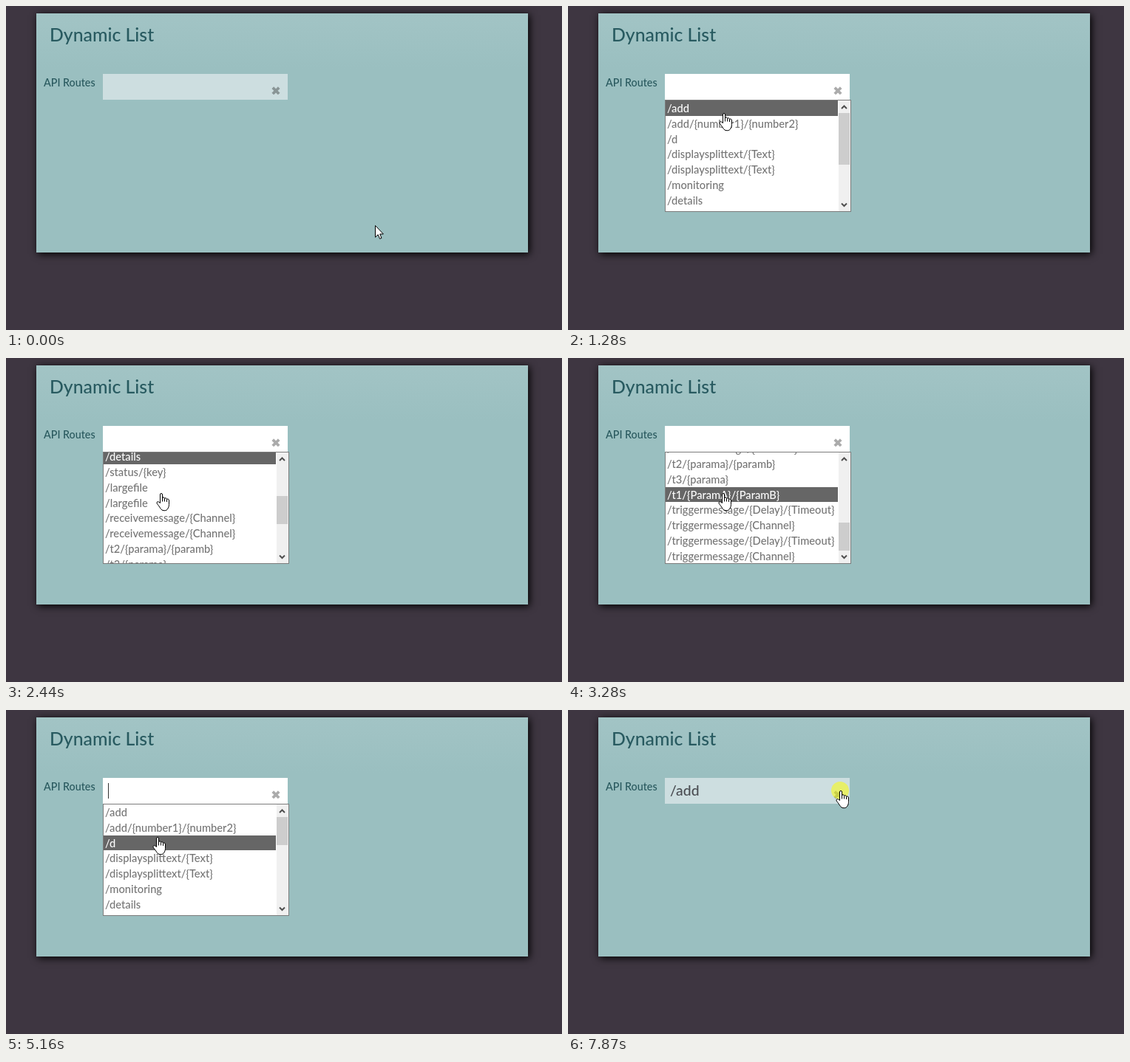
These frames come from a looping animation (752x439 px, 8000 ms). An HTML page with a canvas:

```html
<!DOCTYPE html>
<html lang="en">
<head>
<meta charset="utf-8">
<title>Dynamic List</title>
<style>
  html, body { margin: 0; width: 100%; height: 100%; overflow: hidden; background: #3e3641; }
  body { position: relative; font: 500 15px Lato, "Open Sans", sans-serif; }
  body div, canvas { position: absolute; white-space: pre; }
  canvas { left: 0; top: 0; }
  #panel {
    left: 41px; top: 10px; width: 665px; height: 324px;
    background: linear-gradient(#a2c4c5, #9abfc0 75px);
    box-shadow: 2px 2px 10px #000;
  }
  #title { left: 59px; top: 24px; font-size: 24.8px; line-height: 30px; color: #285a60; }
  #label { left: 51px; top: 95px; font-size: 14.3px; line-height: 18px; color: #28585d; }
  #field { left: 131px; top: 92px; width: 250px; height: 35px; background: #cddee0; }
  #field.focus { background: #fff; }
  #value { left: 7px; top: 5px; font-size: 19.4px; line-height: 23px; color: #4a4d52; }
  #caret { left: 7px; top: 7px; width: 1px; height: 21px; background: #333; }
  #list {
    left: 131px; top: 127px; width: 250px; height: 150px;
    border: 1px solid #7c7c7c; background: #fff; overflow: hidden;
  }
  .row { left: 0; width: 231px; padding-left: 2px; font-size: 14.7px; line-height: 21px; color: #757575; }
  .row.on { background: #666; color: #fff; }
  #bar { left: 234px; top: 0; width: 16px; height: 150px; background: #f0f0f0; }
  #thumb { left: 0; width: 15px; background: #cdcdcd; }
  #bar svg { position: absolute; left: -1px; top: 0; }
</style>
</head>
<body>
<div id="panel"></div>
<div id="title">Dynamic List</div>
<div id="label">API Routes</div>
<div id="field"><div id="value">/add</div><div id="caret"></div></div>
<div id="list">
  <div id="bar">
    <div id="thumb"></div>
    <svg width="17" height="150" fill="none" stroke="#505050" stroke-width="2">
      <path d="M5 11 8.5 7.5 12 11M5 139.5 8.5 143 12 139.5"/>
    </svg>
  </div>
</div>
<canvas id="top" width="752" height="439"></canvas>
<script>
const LOOP = 8000, TICK = 77, BLINK = 550;
const ROW = 20.8, VIEW = 150, TRACK = 116, LIST_TOP = 128;
const routes = [
  '/add', '/add/{number1}/{number2}', '/d',
  '/displaysplittext/{Text}', '/displaysplittext/{Text}',
  '/monitoring', '/details', '/status/{key}',
  '/monitoring', '/details', '/status/{key}',
  '/largefile', '/largefile',
  '/receivemessage/{Channel}', '/receivemessage/{Channel}',
  '/t2/{parama}/{paramb}', '/t3/{parama}', '/t1/{ParamA}/{ParamB}',
  '/triggermessage/{Delay}/{Timeout}', '/triggermessage/{Channel}',
  '/triggermessage/{Delay}/{Timeout}', '/triggermessage/{Channel}'
];
const END = routes.length * ROW - VIEW;

const home = { x: 499, y: 297 };
const moves = [
  { from: 70, to: 440, x: 212, y: 110 },
  { from: 1280, to: 1280, x: 210, y: 145 },
  { from: 1360, to: 1440, x: 209, y: 183 },
  { from: 4000, to: 4210, x: 221, y: 231 },
  { from: 4930, to: 5160, x: 204, y: 172 },
  { from: 5240, to: 5540, x: 197, y: 143 },
  { from: 6320, to: 6470, x: 384, y: 118 },
  { from: 6700, to: 6860, x: 373, y: 112 },
  { from: 7010, to: 7170, x: 368, y: 109 }
];
const scrolls = [
  { from: 1590, to: 1900, y: 139 },
  { from: 2280, to: 2820, y: END },
  { from: 4460, to: 4760, y: 0 }
];
const clicks = [670, 5710, 7870], PRESS = 150;
const focused = [745, 5790], opened = [820, 6090], handOnly = [1280, 6320];
const firstHover = 1280, moreAt = 1750, caretOn = 4930;

const $ = id => document.getElementById(id);
const ctx = $('top').getContext('2d');
const within = (t, [a, b]) => t >= a && t < b;
const show = (el, on) => { el.style.display = on ? '' : 'none'; };
const mix = (a, b, k) => a + (b - a) * k;
const smooth = k => k * k * (3 - 2 * k);

// Progress in even ticks; the first step lands at the start time.
function stepped(t, { from, to }) {
  if (t < from) return 0;
  if (t >= to) return 1;
  const n = Math.round((to - from) / TICK);
  return (Math.floor((t - from) / (to - from) * n) + 1) / (n + 1);
}

function pointerAt(t) {
  let { x, y } = home;
  for (const m of moves) {
    const k = stepped(t, m);
    x = mix(x, m.x, k);
    y = mix(y, m.y, k);
  }
  return [Math.round(x), Math.round(y)];
}

const scrollAt = t =>
  Math.floor(scrolls.reduce((s, m) => mix(s, m.y, smooth(stepped(t, m))), 0));
const settledScroll = t => scrolls.reduce((s, m) => t >= m.to ? m.y : s, 0);
const caretVisible = t => Math.floor((t - caretOn) / BLINK) % 2 === 0;

const rows = routes.map(text => {
  const el = document.createElement('div');
  el.className = 'row';
  el.textContent = text;
  $('list').insertBefore(el, $('bar'));
  return el;
});

function drawList(t, y) {
  const open = within(t, opened);
  show($('list'), open);
  if (!open) return;
  const s = scrollAt(t);
  const hover = t < firstHover ? -1 : Math.floor((y - LIST_TOP + settledScroll(t)) / ROW);
  rows.forEach((el, i) => {
    const a = Math.round(i * ROW - s), b = Math.round((i + 1) * ROW - s);
    el.style.top = a + 'px';
    el.style.height = b - a + 'px';
    el.classList.toggle('on', i === hover);
  });
  // The thumb trails the content by one tick.
  const full = (t < moreAt ? 12 : routes.length) * ROW;
  const room = TRACK * (1 - VIEW / full);
  const thumb = $('thumb').style;
  thumb.height = Math.round(TRACK * VIEW / full) + 'px';
  thumb.top = 17 + Math.round(Math.min(room, TRACK * scrollAt(t - TICK) / full)) + 'px';
}

const arrow = new Path2D('M.5 .5V16.3L4.2 12.8 6.6 18.4 9 17.4 6.7 12H11.4Z');
const hand = new Path2D(
  'M5.5 13.5V2Q5.5 .5 7 .5T8.5 2V7Q8.7 5.6 10 5.7 11.4 5.9 11.5 7.6 12 6.5 13 6.7' +
  ' 14.4 7 14.5 8.6 15 7.8 16 8 17.5 8.4 17.5 10V15.5Q17.5 18 16.5 20 15.4 22.4 14 23.2' +
  ' 12.4 24 10 23.7 7.6 23.4 6.5 21.5L3 16.5Q.3 13.8 1 12.5 1.9 11 3.6 12Z');
const fingers = new Path2D('M8.5 7V11.5M11.5 7.6V11.5M14.5 8.6V12');
const beam = new Path2D('M-3.5 -8.5H3.5M0 -8.5V8.5M-3.5 8.5H3.5');
const cross = new Path2D(
  'M360.8 110.6 369.2 119M360.8 119 363.7 116.1M366.3 113.5 369.2 110.6');

function pointerKind(t, x, y) {
  if (within(t, handOnly)) return 'hand';
  if (y < 92 || y >= 127 || x < 131 || x >= 381) return 'arrow';
  return x > 354 && x < 376 ? 'hand' : 'beam';
}

function drawPointer(kind, x, y) {
  ctx.save();
  ctx.lineWidth = 1;
  ctx.strokeStyle = '#000';
  ctx.fillStyle = '#fff';
  if (kind === 'beam') {
    ctx.translate(x + .5, y + .5);
    ctx.stroke(beam);
  } else {
    ctx.translate(kind === 'hand' ? x - 6 : x, y);
    const shape = kind === 'hand' ? hand : arrow;
    ctx.fill(shape);
    ctx.stroke(shape);
    if (kind === 'hand') ctx.stroke(fingers);
  }
  ctx.restore();
}

function drawCross() {
  ctx.strokeStyle = 'rgba(0,0,0,.33)';
  ctx.lineWidth = 3.8;
  ctx.stroke(cross);
}

function drawClick(x, y) {
  ctx.fillStyle = 'rgba(255,255,0,.53)';
  ctx.beginPath();
  ctx.arc(x, y, 12, 0, Math.PI * 2);
  ctx.fill();
}

function render(t) {
  const [x, y] = pointerAt(t);
  const focus = within(t, focused);
  $('field').classList.toggle('focus', focus);
  show($('value'), t >= focused[1]);
  show($('caret'), focus && caretVisible(t));
  drawList(t, y);

  ctx.clearRect(0, 0, 752, 439);
  drawCross();
  if (clicks.some(c => within(t, [c, c + PRESS]))) drawClick(x, y);
  drawPointer(pointerKind(t, x, y), x, y);
}

let start;
function frame(now) {
  start ??= now;
  render((now - start) % LOOP);
  requestAnimationFrame(frame);
}
render(0);
requestAnimationFrame(frame);
</script>
</body>
</html>
```
